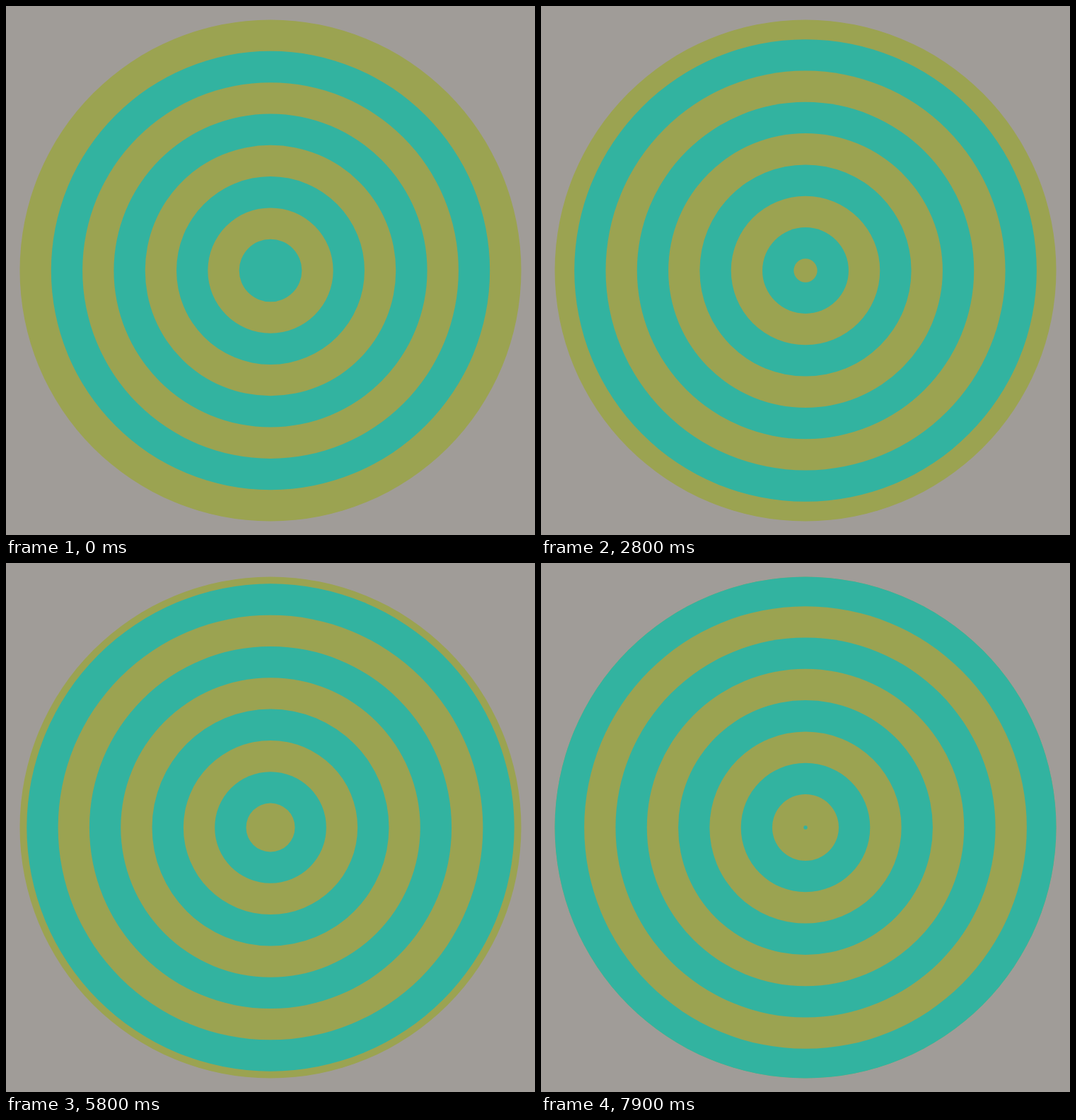
An HTML page that plays this animation: 748x748 px, repeating every 8 s.

```html
<!DOCTYPE html>
<html lang="en">
<head>
<meta charset="utf-8">
<title>Growing rings</title>
<style>
  html, body { margin: 0; width: 100%; height: 100%; overflow: hidden; background: #a09c98; }
  svg { display: block; width: 100%; height: 100%; }
</style>
</head>
<body>
<svg id="stage" viewBox="0 0 748 748"></svg>
<script>
const LOOP = 8000, STEP = 100;
const CENTER = 374, OUTER = 354.5, BANDS = 8;
const BAND = OUTER / BANDS;
const GROWTH = 2 * BAND / 149; // radius gained per step
const OLIVE = '#9ba351', TEAL = '#32b3a0';

const stage = document.getElementById('stage');
const discs = [];

// Stacked discs, largest first; index -1 emerges late in the loop.
for (let index = BANDS; index >= -1; index--) {
  const circle = document.createElementNS('http://www.w3.org/2000/svg', 'circle');
  circle.setAttribute('cx', CENTER);
  circle.setAttribute('cy', CENTER);
  circle.setAttribute('fill', index % 2 ? TEAL : OLIVE);
  stage.append(circle);
  discs.push({ circle, index });
}

function draw(time) {
  const offset = Math.floor((time % LOOP) / STEP) * GROWTH;
  for (const { circle, index } of discs) {
    const radius = Math.min(OUTER, Math.max(0, index * BAND + offset));
    circle.setAttribute('r', radius.toFixed(3));
  }
}

let start;
function tick(now) {
  start ??= now;
  draw(now - start);
  requestAnimationFrame(tick);
}
draw(0);
requestAnimationFrame(tick);
</script>
</body>
</html>
```
